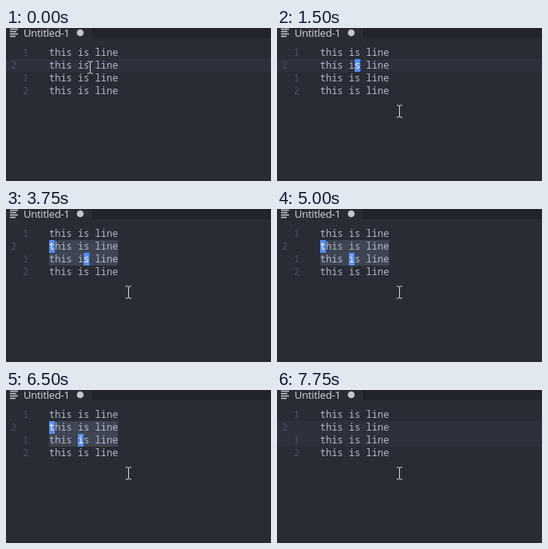
An HTML page that plays this animation: 332 px wide and 192 px high, repeating every 8 s.

```html
<!DOCTYPE html>
<html lang="en">
<head>
<meta charset="utf-8">
<title>Editor</title>
<style>
  html, body { margin: 0; width: 100%; height: 100%; overflow: hidden; background: #282c34; }
  svg { display: block; width: 332px; height: 192px; }
  text { white-space: pre; }
  .code { font: 500 12px "Noto Sans Mono", "DejaVu Sans Mono", monospace; fill: #b3bac6; }
  .num { fill: #495162; font-weight: 400; }
  .lit { fill: #fff; }
  .tab { font: 13px "Open Sans", "Noto Sans", sans-serif; fill: #d7dae0; }
  .active { fill: #2c313c; }
  .selection { fill: #3e4451; }
  .caret { fill: #568cf8; }
</style>
</head>
<body>
<svg viewBox="0 0 332 192">
  <rect width="332" height="192" fill="#282c34"/>
  <rect x="109" width="223" height="13" fill="#21252b"/>
  <path d="M108.5 0V13" stroke="#1c2026"/>
  <path d="M5 1.5H15M5 4.5H13M5 7.5H15M5 10.5H12" stroke="#c5c9d1" stroke-width="1.4"/>
  <text class="tab" x="22" y="11" textLength="58">Untitled-1</text>
  <circle cx="93" cy="6" r="4.3" fill="#c3c6cc"/>
  <g id="back"></g>
  <g id="lines"></g>
  <g id="carets"></g>
  <path id="mouse" d="M-3.5 -7.5H-1L0 -6.5L1 -7.5H3.5M0 -6.5V6.5M-3.5 7.5H-1L0 6.5L1 7.5H3.5"
        fill="none" stroke="#d9dce1"/>
</svg>
<script>
const LOOP = 8000, LEFT = 54, TOP = 23, ROW = 16, CHAR = 7.2;
const LINE = "this is line";
const $ = id => document.getElementById(id);

// Each step overrides part of the state; carets are [row, column].
const steps = [
  [0,    { current: 1, active: [1], selected: [], carets: [], bar: false, mouse: [105.5, 49.5] }],
  [250,  { mouse: null }],
  [500,  { current: 0, active: [0], carets: [[0, 6]] }],
  [750,  { mouse: [153.5, 104.5] }],
  [1000, { carets: [] }],
  [1500, { current: 1, active: [1], carets: [[1, 6]] }],
  [2000, { active: [], selected: [1] }],
  [2500, { carets: [] }],
  [2750, { selected: [1, 2], carets: [[1, 0], [2, 6]] }],
  [3250, { carets: [] }],
  [3750, { carets: [[1, 0], [2, 6]] }],
  [4250, { carets: [] }],
  [4750, { carets: [[1, 0], [2, 6]] }],
  [5000, { carets: [[1, 0], [2, 5]] }],
  [5250, { carets: [] }],
  [5750, { carets: [[1, 0], [2, 5]] }],
  [6000, { carets: [[1, 0], [2, 8]] }],
  [6500, { carets: [[1, 0], [2, 5]] }],
  [7000, { active: [1, 2], selected: [], carets: [[1, 0], [2, 0]] }],
  [7250, { bar: true }],
  [7750, { carets: [] }]
];

const rect = (cls, x, row, w) =>
  `<rect class="${cls}" x="${x}" y="${TOP + row * ROW}" width="${w}" height="${ROW}"/>`;
const text = (cls, x, row, s) =>
  `<text class="code ${cls}" x="${x}" y="${TOP + row * ROW + 12}">${s}</text>`;

function lineMarkup(row, current) {
  const own = row === current;
  const number = own ? row + 1 : Math.abs(row - current);
  return text("num", own ? 6 : 21, row, number) + text("", LEFT, row, LINE);
}

function caretMarkup([row, col], bar) {
  const x = LEFT + col * CHAR;
  return bar ? rect("caret", x - 0.5, row, 1.5)
             : rect("caret", x, row, CHAR) + text("lit", x, row, LINE[col]);
}

function draw(s) {
  $("back").innerHTML =
    s.active.map(r => rect("active", 0, r, 332)).join("") +
    s.selected.map(r => rect("selection", LEFT, r, LINE.length * CHAR)).join("");
  $("lines").innerHTML = [0, 1, 2, 3].map(r => lineMarkup(r, s.current)).join("");
  $("carets").innerHTML = s.carets.map(c => caretMarkup(c, s.bar)).join("");
  $("mouse").style.display = s.mouse ? "" : "none";
  if (s.mouse) $("mouse").setAttribute("transform", `translate(${s.mouse})`);
}

const start = performance.now();
let shown = 0;

function tick() {
  const t = (performance.now() - start) % LOOP;
  const past = steps.filter(([at]) => at <= t);
  if (past.length !== shown) {
    shown = past.length;
    draw(Object.assign({}, ...past.map(([, change]) => change)));
  }
  requestAnimationFrame(tick);
}
tick();
</script>
</body>
</html>
```
